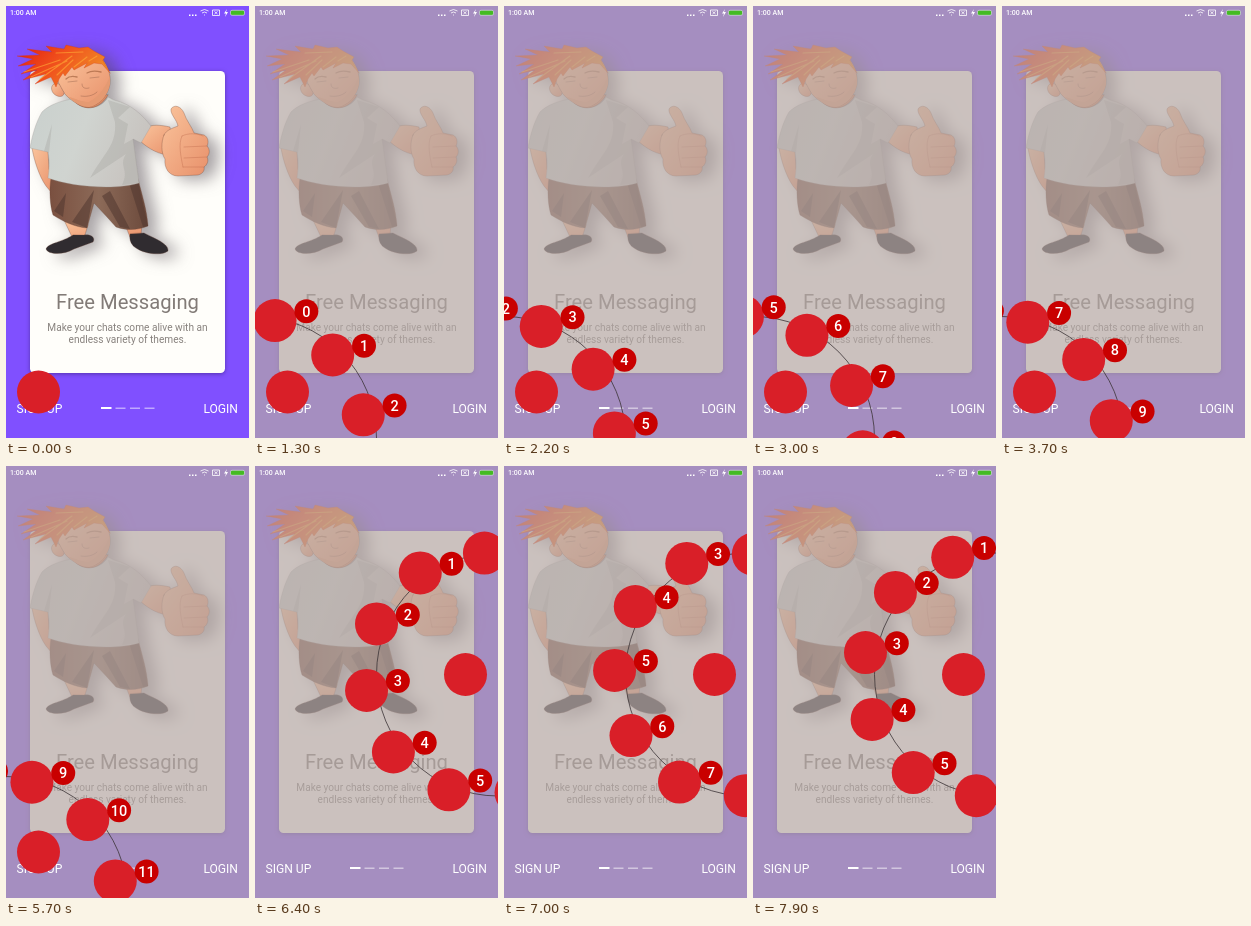
An HTML page that plays this animation: 243 px wide and 432 px high, repeating every 8 s.

```html
<!DOCTYPE html>
<html lang="en">
<head>
<meta charset="utf-8">
<title>Circular menu</title>
<style>
  html, body { margin: 0; width: 100%; height: 100%; overflow: hidden; background: #8050ff; }
  svg { display: block; width: 100vw; height: 100vh; font-family: Roboto, sans-serif; }
  .card { filter: drop-shadow(0 1.5px 2px rgba(40, 20, 90, .5)); }
  .boy { filter: drop-shadow(10px 4px 8px rgba(80, 72, 80, .5)); stroke-linejoin: round; stroke-linecap: round; }
</style>
</head>
<body>
<svg viewBox="0 0 243 432">
  <defs>
    <linearGradient id="hair" x1="0" y1="0" x2="1" y2=".4">
      <stop offset="0" stop-color="#e01c10"/>
      <stop offset=".5" stop-color="#f0501c"/>
      <stop offset="1" stop-color="#f08a28"/>
    </linearGradient>
    <linearGradient id="skin" x1="0" y1="0" x2="1" y2="1">
      <stop offset="0" stop-color="#fac49c"/>
      <stop offset="1" stop-color="#e8906a"/>
    </linearGradient>
    <linearGradient id="shirt" x1="0" y1="0" x2="1" y2=".3">
      <stop offset="0" stop-color="#c9d0cd"/>
      <stop offset=".5" stop-color="#d0d4d0"/>
      <stop offset="1" stop-color="#c8c4c0"/>
    </linearGradient>
    <linearGradient id="shorts">
      <stop offset="0" stop-color="#7a5040"/>
      <stop offset=".5" stop-color="#8c6a58"/>
      <stop offset="1" stop-color="#6c4a3c"/>
    </linearGradient>
  </defs>

  <rect width="243" height="432" fill="#8050ff"/>
  <rect class="card" x="24" y="65" width="195" height="302" rx="4.500" fill="#fffefa"/>

  <g class="boy" stroke="#6a4034" stroke-opacity=".6" stroke-width=".5">
    <g fill="url(#skin)">
      <path d="M58 214L66 231L78 232L82 219ZM118 216L124 231L135 230L136 216Z"/>
      <path d="M26 142C28 154 33 170 40 180L45 186L48 174L43 163L42 145Z"/>
      <path d="M138 122C146 118 155 119 164 121L168 149C153 150 142 142 134 135Z"/>
    </g>
    <path fill="#302c30" d="M67 229C57 236 42 237 40 243C42 249 58 249 68 243L87 236C90 231 84 228 78 229ZM124 228C123 234 125 239 130 242C138 248 156 250 162 245C163 238 150 233 138 227Z"/>
    <path fill="url(#shorts)" d="M45 172C43 184 44 200 47 209C58 216 69 221 81 222L88 197L101 211L110 221C122 225 132 224 142 220C141 204 136 189 132 173Z"/>
    <path fill="#513830" stroke="none" opacity=".55" d="M48 205L60 187L57 211ZM66 216L88 184L81 222ZM96 190L114 221L124 223L104 185ZM124 180L137 221L142 220L132 175Z"/>
    <path fill="url(#shirt)" stroke="#9a9490" d="M66 93C54 95 43 99 36 106C30 116 26 130 24 142L42 146C44 156 43 165 42 172C62 180 108 185 133 177L127 133L135 137L145 120C137 110 126 98 108 94L102 91C95 104 76 106 66 93Z"/>
    <path fill="#a9a7a4" stroke="none" opacity=".4" d="M102 94L124 101L112 112L122 118L118 138L127 133L133 177L116 179C124 164 112 160 120 148L84 172C98 147 111 139 109 116ZM38 145L46 118L43 147Z"/>
    <path fill="#d98a63" d="M66 90C70 104 92 108 102 89Z"/>
    <path fill="url(#skin)" d="M51 67C51 78 56 86 63 92C70 98 77 101 83 101C94 99 102 89 104 78C105 67 101 57 93 50L62 52Z"/>
    <path fill="#e59a72" stroke="none" d="M104 70C100 80 94 90 83 96C75 96 69 92 63 91C70 98 77 101 83 101C94 99 102 89 104 78Z"/>
    <path fill="url(#skin)" d="M53 78C46 75 43 83 48 88C53 92 58 91 58 87Z"/>
    <path fill="url(#hair)" stroke="#d03818" d="M104 67L96 58L88 57L78 62L81 57L68 64L66 61L59 70L57 67L53 73L50 81L45 71L29 78L40 68L17 74L31 64L15 68L30 58L12 60L27 53L11 50L34 49L21 43L46 46L40 40L58 43L60 39L73 42L82 41L88 45L99 51L97 54Z"/>
    <path fill="none" stroke="#ffb038" stroke-width="1.1" d="M18 66L54 54M25 71L61 55M34 73L66 50M51 69L67 54M68 61L81 51M50 47L77 46M83 55L91 50"/>
    <g fill="none">
      <path d="M60 73C63 70 67 70 71 71M81 67C86 64 91 65 95 66" stroke="#9c5a38" stroke-width="1.300"/>
      <path d="M62 76L71 75M84 72L93 71M76 78C76 82 79 83 83 82M75 90C80 91 87 90 91 86"/>
    </g>
    <path fill="url(#skin)" d="M158 129C160 124 167 122 172 120C171 114 164 108 165 103C168 98 175 100 178 107C180 114 186 121 188 127L198 129C202 131 203 136 201 140C204 143 204 148 201 151C203 155 201 159 198 161C199 165 196 168 192 169L172 170C163 170 158 162 159 153C155 147 155 136 158 129Z"/>
    <path fill="none" stroke="#b0583c" d="M176 130C182 127 190 127 197 130M178 141L201 140M178 152L201 151M177 161L198 161M176 130C172 138 175 151 177 161"/>
  </g>

  <g text-anchor="middle">
    <text x="121.5" y="302.5" font-size="20.2" fill="#827b77">Free Messaging</text>
    <g font-size="10.15" fill="#88827e">
      <text x="121.5" y="324.5">Make your chats come alive with an</text>
      <text x="121.5" y="336.500">endless variety of themes.</text>
    </g>
  </g>

  <rect id="dim" width="243" height="432" fill="#b5a8a6"/>

  <g fill="#fff">
    <text x="4" y="9" font-size="7" font-weight="500">1:00 AM</text>
    <path d="M183 8.5h1.5v1.5h-1.5zM186 8.5h1.5v1.5h-1.5zM189 8.5h1.5v1.5h-1.5zM221 3L218 7.5H220L219 11L222 6H220Z"/>
    <path d="M194.500 5Q198.500 2 202.500 5M196 7Q198.500 5 201 7M198 9h1M206.500 4h7v5.500h-7zM208.500 5.500l3 2.500M211.500 5.500l-3 2.500" fill="none" stroke="#fff" stroke-width=".8"/>
    <rect x="224.500" y="4.300" width="14" height="5" rx="1.500" fill="#44bb22" stroke="#e4dcf4" stroke-width=".6"/>
    <g font-size="12.1">
      <text x="10.500" y="407">SIGN UP</text>
      <text x="232" y="407" text-anchor="end">LOGIN</text>
    </g>
    <rect x="95" y="401" width="10.500" height="2"/>
    <path d="M109.500 401.500h10v1.500h-10zM124 401.500h10v1.500h-10zM138.500 401.500h10v1.500h-10z" opacity=".5"/>
  </g>

  <g id="menu">
    <circle id="ring" fill="none" stroke="#3b3436" stroke-width=".8"/>
  </g>
  <circle id="fab" r="21.5" fill="#d91f28"/>
</svg>
<script>
  const LOOP = 8000, RADIUS = 121.5, STEP = 32.1, COUNT = 12;
  const OPEN = 1000, SWITCH = 6100;
  const $ = id => document.getElementById(id);

  // Scroll angle of item 0, as [ms, degrees]
  const left = {
    x: 0, y: 432, side: 1, fab: [32.5, 386],
    scroll: [[1400, 14.8], [3000, -160.3], [4500, -264], [5700, -271.2]]
  };
  const right = {
    x: 243, y: 208.5, side: -1, fab: [210.5, 208.5],
    scroll: [[6200, 15], [7000, -72.4], [7900, -16.7]]
  };

  function make(tag, attrs, parent) {
    const el = document.createElementNS('http://www.w3.org/2000/svg', tag);
    for (const key in attrs) el.setAttribute(key, attrs[key]);
    return parent.appendChild(el);
  }

  const items = Array.from({ length: COUNT }, (_, i) => {
    const g = make('g', {}, $('menu'));
    make('circle', { r: 21.5, fill: '#d91f28' }, g);
    make('circle', { cx: 31.3, cy: -9.3, r: 12, fill: '#c90000' }, g);
    make('text', {
      x: 31.3, y: -4, fill: '#fff', 'font-size': 14.5, 'font-weight': 500, 'text-anchor': 'middle'
    }, g).textContent = i;
    return g;
  });

  const clamp = v => Math.min(1, Math.max(0, v));
  const ease = p => p * p * (3 - 2 * p);

  function sample(keys, t) {
    let value = keys[0][1];
    for (let i = 1; i < keys.length; i++) {
      const [t0, v0] = keys[i - 1], [t1, v1] = keys[i];
      value += (v1 - v0) * ease(clamp((t - t0) / (t1 - t0)));
    }
    return value;
  }

  function draw(t) {
    const menu = t < SWITCH ? left : right;
    const open = ease(clamp((t - OPEN) / 250));
    const radius = RADIUS * open;
    const base = sample(menu.scroll, t);

    $('dim').setAttribute('opacity', .7 * open);
    $('menu').setAttribute('opacity', open);
    $('ring').setAttribute('cx', menu.x);
    $('ring').setAttribute('cy', menu.y);
    $('ring').setAttribute('r', radius);
    $('fab').setAttribute('cx', menu.fab[0]);
    $('fab').setAttribute('cy', menu.fab[1]);

    items.forEach((item, i) => {
      const deg = base + i * STEP;
      const a = deg * Math.PI / 180;
      const x = menu.x + menu.side * radius * Math.sin(a) - 11;
      const y = menu.y - radius * Math.cos(a);
      item.setAttribute('transform', `translate(${x} ${y})`);
      item.setAttribute('display', deg > -60 && deg < 240 ? 'inline' : 'none');
    });
  }

  const start = performance.now();
  function tick() {
    draw((performance.now() - start) % LOOP);
    requestAnimationFrame(tick);
  }
  tick();
</script>
</body>
</html>
```
